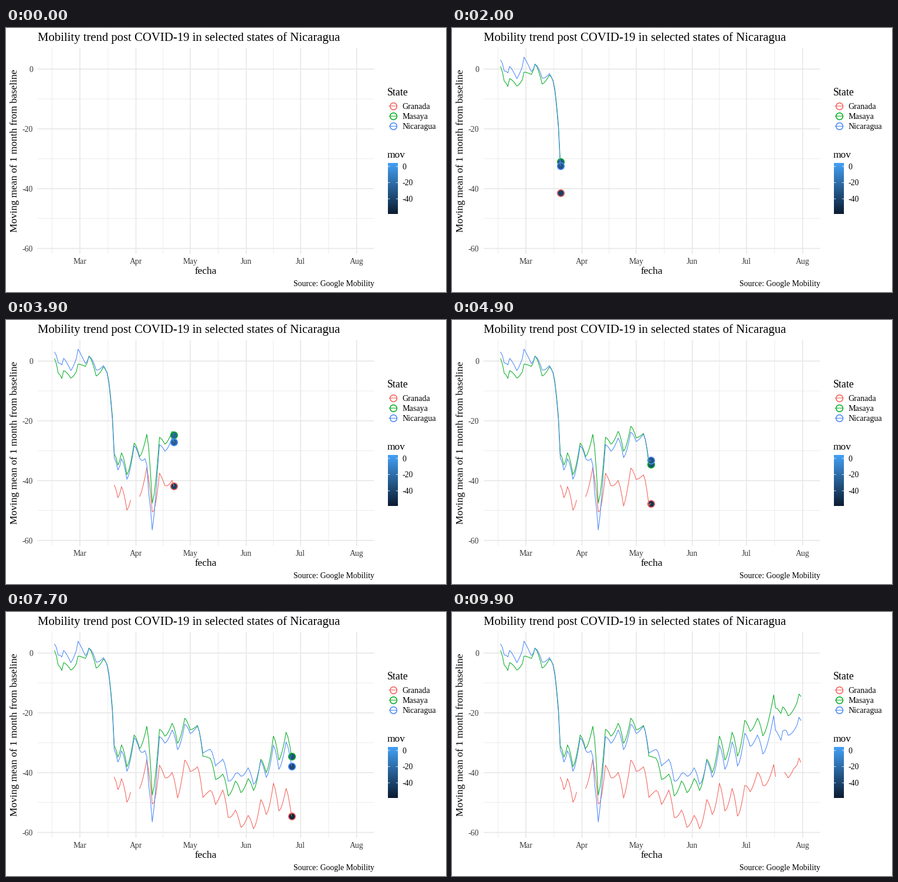
A matplotlib script for the animation above (10000 ms loop, 750 by 450 pixels).

```python
import numpy as np
import matplotlib.pyplot as plt
from matplotlib.animation import FuncAnimation
from matplotlib.colors import LinearSegmentedColormap

W, H, DPI = 750, 450, 100
FRAMES, INTERVAL = 100, 100
PT = 72 / DPI  # points per pixel
plt.rcParams["font.family"] = "Liberation Serif"

RED, GREEN, BLUE = "#F6645C", "#0CAE28", "#4E8AFA"
GRID, TICK = "#E7E7E7", "#3B3B3B"
LEFT, RIGHT, TOP, BOTTOM = 53.5, 627.5, 34, 385
LOW, HIGH = -58.8, 4.0
FIRST, SPAN = -1, 169  # day 0 is 16 February
DAYS = np.arange(167)
SHADE = LinearSegmentedColormap.from_list("mov", ["#0B1D32", "#43A0F4"])

# Masaya: the fall in March, a weekly peak and dip, the July rise.
MARCH = [(0, 0.8), (2, -4), (4, -5.8), (5, -3.2), (9, -5.7), (12, -3.6),
         (13, -1), (17, -1.8), (19, 1.7), (23, -5), (27, -2), (29, -3.8),
         (31, -12), (33, -31), (35, -34.8)]
PEAKS = [-30.7, -27.4, -24.5, -25.5, -23.5, -21.8, -24.2, -35.2, -40.5, -42.8,
         -42, -35.5, -27.8, -26.5, -22.5, -21.8]
DIPS = [-38, -32, -47.5, -27.8, -30.2, -25.7, -34.5, -42.3, -47.8, -46.7,
        -46, -40, -35.8, -34.5, -26.2, -27.7]
JULY = [(151, -14), (152, -18.3), (155, -20.2), (156, -18), (159, -21),
        (163, -17.8), (165, -13.7), (166, -14.5)]

# How far the other two run above Masaya.
NICARAGUA_GAP = [(0, 2.2), (4, 4.5), (9, 2.5), (13, 5), (17, 1), (19, -0.2),
                 (23, 2), (31, -1), (37, -2), (47, -0.5), (50, -5.5),
                 (52, -15), (54, -9), (57, -2.5), (72, -2), (80, 0), (90, 5),
                 (96, 5), (100, 2.5), (103, 5.5), (109, 2.7), (114, -0.5),
                 (121, -3), (131, -3.3), (138, -5), (151, -7), (155, -9),
                 (158, -6.3), (166, -8)]
GRANADA_GAP = [(33, -10.5), (47, -13.3), (52, -10.5), (54, -3), (58, -12),
               (68, -18.3), (72, -14), (82, -13.8), (93, -5.3), (103, -11.6),
               (117, -14), (135, -21.8), (145, -16.5), (151, -23.3),
               (162, -19.8), (166, -22)]


def swing(points):
    """Daily values through the points; each move starts slowly."""
    days, values = np.array(points).T
    i = np.clip(np.searchsorted(days, DAYS, "right") - 1, 0, len(days) - 2)
    t = (DAYS - days[i]) / (days[i + 1] - days[i])
    return values[i] + (values[i + 1] - values[i]) * t ** 1.5


def blend(points):
    return np.interp(DAYS, *zip(*points))


weeks = [point for k, (peak, dip) in enumerate(zip(PEAKS, DIPS))
         for point in ((37 + 7 * k, peak), (40 + 7 * k, dip))]
masaya = swing(MARCH + weeks + JULY)
nicaragua = masaya + blend(NICARAGUA_GAP)
granada = masaya + blend(GRANADA_GAP)
for start, stop in [(0, 33), (43, 47), (153, 157)]:
    granada[start:stop] = np.nan

STATES = [("Granada", RED, granada), ("Masaya", GREEN, masaya),
          ("Nicaragua", BLUE, nicaragua)]


def px(day):
    return 82.8 + 3.083 * np.asarray(day)


def py(value):
    return 70 - 5.095 * np.asarray(value)


def shade(value):
    return SHADE((value - LOW) / (HIGH - LOW))


fig = plt.figure(figsize=(W / DPI, H / DPI), dpi=DPI, facecolor="white")
ax = fig.add_axes([0, 0, 1, 1])
ax.axis("off")


def label(x, y, text, size, color="black", ha="left", **kw):
    ax.text(x, y, text, fontsize=size * PT, color=color, ha=ha,
            va="baseline", **kw)


def rule(xs, ys, width, color=GRID, z=1):
    ax.plot(xs, ys, color=color, lw=width * PT, zorder=z,
            solid_capstyle="butt", snap=False)


def ring(color, z):
    return ax.plot([], [], "o", ms=11.6 * PT, mew=1.6 * PT, mec=color,
                   mfc="none", zorder=z)[0]


# Grid and axes
months = dict(Mar=14, Apr=45, May=75, Jun=106, Jul=136, Aug=167)
starts = np.array(list(months.values()))
for day in np.append(-1.4, (starts[:-1] + starts[1:]) / 2):
    rule([px(day)] * 2, [TOP, BOTTOM], 0.8)
for value in (-10, -30, -50):
    rule([LEFT, RIGHT], [py(value)] * 2, 0.8)
for name, day in months.items():
    rule([px(day)] * 2, [TOP, BOTTOM], 1.6)
    label(px(day), 402, name, 13.8, TICK, "center")
for value in (0, -20, -40, -60):
    rule([LEFT, RIGHT], [py(value)] * 2, 1.6)
    label(46, py(value) + 5, str(value), 13.8, TICK, "right")

label(53.5, 22, "Mobility trend post COVID-19 in selected states of Nicaragua", 20.8)
label(340, 419, "fecha", 17.4, ha="center")
label(627.5, 440, "Source: Google Mobility", 13.8, ha="right")
label(19, 209, "Moving mean of 1 month from baseline", 17.4, ha="center",
      rotation=90, rotation_mode="anchor")

# State legend
label(649.7, 115, "State", 17.8)
for i, (name, color, _) in enumerate(STATES):
    y = 133 + 17.2 * i
    ring(color, 3).set_data([659.5], [y])
    rule([652.7, 666.3], [y, y], 1.07, color, 4)
    label(675.6, y + 5, name, 14)

# Colour bar
BAR_L, BAR_R, BAR_T, BAR_B = 651, 668, 230.5, 317
label(650, 221, "mov", 17.4)
ax.imshow(np.linspace(1, 0, 256)[:, None], cmap=SHADE, aspect="auto",
          extent=[BAR_L, BAR_R, BAR_B, BAR_T], zorder=2)
for value in (0, -20, -40):
    y = BAR_T + (HIGH - value) / (HIGH - LOW) * (BAR_B - BAR_T)
    rule([BAR_L, BAR_L + 3.4], [y, y], 0.8, "white", 3)
    rule([BAR_R - 3.4, BAR_R], [y, y], 0.8, "white", 3)
    label(676, y + 4.7, str(value), 13.8)

ax.set_xlim(0, W)
ax.set_ylim(H, 0)

dots = [ring(color, 5 + 0.1 * i) for i, (_, color, _) in enumerate(STATES)]
lines = [ax.plot([], [], color=color, lw=1.07 * PT, zorder=6 + 0.1 * i)[0]
         for i, (_, color, _) in enumerate(STATES)]


def draw(frame):
    # Several days can share a frame; the latest one is shown.
    day = FIRST + min(SPAN, int((frame + 0.5) * SPAN / (FRAMES - 1)))
    for dot, line, (_, _, series) in zip(dots, lines, STATES):
        line.set_data(px(DAYS[:day + 1]), py(series[:day + 1]))
        visible = 0 <= day < len(series) and np.isfinite(series[day])
        dot.set_visible(visible)
        if visible:
            dot.set_data([px(day)], [py(series[day])])
            dot.set_markerfacecolor(shade(series[day]))
    return dots + lines


anim = FuncAnimation(fig, draw, frames=FRAMES, interval=INTERVAL,
                     init_func=lambda: draw(0), repeat=True, repeat_delay=0)
plt.show()
```
